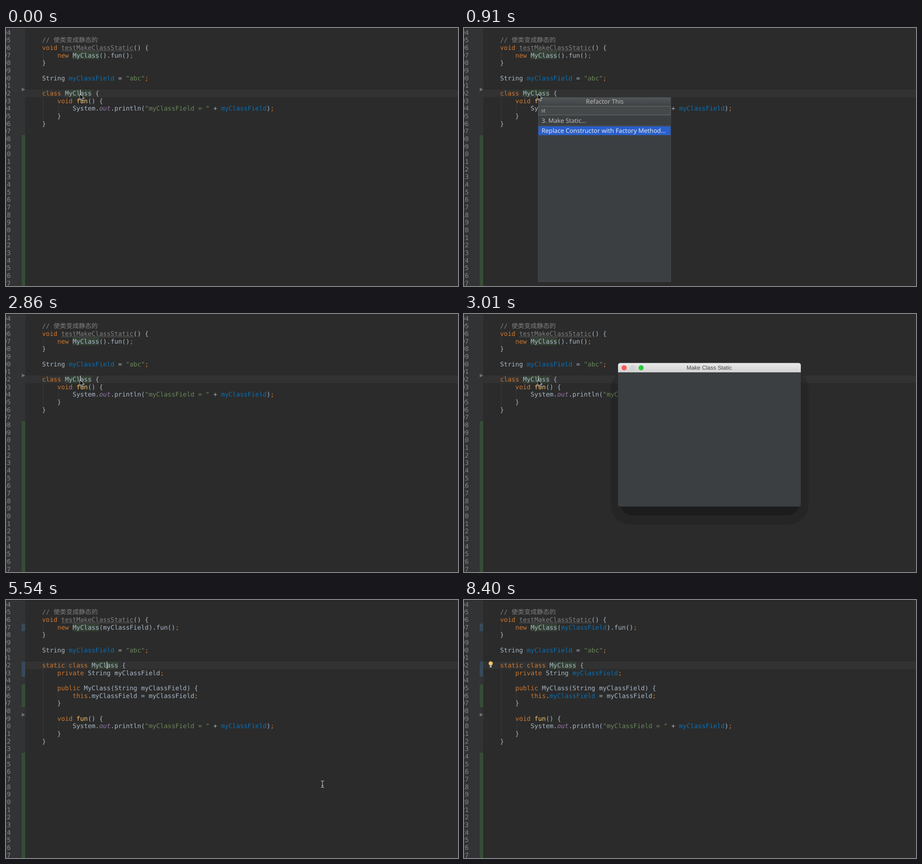
Write an HTML page that moves like this. It is 989x566 px and loops after 8.8 s.

```html
<!DOCTYPE html>
<html lang="zh-CN">
<head>
<meta charset="utf-8">
<title>Make Class Static</title>
<style>
html, body { margin: 0; width: 100%; height: 100%; overflow: hidden; background: #2b2b2b; }
svg { display: block; width: 989px; height: 566px; }
text { white-space: pre; text-rendering: geometricPrecision; }

.code text { font: 13.84px 'DejaVu Sans Mono', 'Noto Sans CJK SC', monospace; fill: #a9b7c6; }
.code .num { fill: #858789; text-anchor: end; }
.code .k { fill: #cc7832; }
.code .s { fill: #6a8759; }
.code .c { fill: #808080; }
.code .f { fill: #0a6fb4; }
.code .m { fill: #ffc66d; }
.code .o { fill: #9876aa; font-style: italic; }
.code .l { fill: #0a6fb4; animation-name: resolve; }
.guide { fill: #393b3c; }
.usage { fill: #344134; }
.added { fill: #384c38; }
.edited { fill: #374a5b; }

.ui text { font: 13.45px 'Noto Sans', 'DejaVu Sans', sans-serif; fill: #bbb; }
.ui .key, .ui .end { text-anchor: end; }
.ui .mid { text-anchor: middle; }
.ui .on { fill: #e4e6ea; }
.ui .dim { fill: #777a7c; }
.ui .typed { font-size: 11px; }
.ui .caption { font-weight: 600; fill: #84878a; }
.ui .title { font: 12.4px 'Liberation Sans', sans-serif; fill: #454545; }
.u { text-decoration: underline; }
.sep { fill: #515456; }

/* hard cuts over one 8.8 s loop */
.t, .l { animation: 8.8s step-end infinite; }
#before { animation-name: before; }
#after { animation-name: after; }
#caret1 { animation-name: caret1; }
#caret2 { animation-name: caret2; }
#bulb { animation-name: bulb; }
#menu { animation-name: menu; }
#all { animation-name: all; }
#typedS { animation-name: typedS; }
#typedSt { animation-name: typedSt; }
#pickLow { animation-name: pickLow; }
#pickTop { animation-name: pickTop; }
#dialog { animation-name: dialog; }
#form { animation-name: form; }
#ringPreview { animation-name: ringPreview; }
#ringRefactor { animation-name: ringRefactor; }
#arrow { animation-name: arrow; }
#beam { animation-name: beam; }
.code .l { animation-name: resolve; }

@keyframes before { 0% { opacity: 1 } 62.95%, 100% { opacity: 0 } }
@keyframes after { 0% { opacity: 0 } 62.95%, 100% { opacity: 1 } }
@keyframes caret1 { 0% { opacity: 1 } 3.63% { opacity: 0 } 32.5% { opacity: 1 } 35.9%, 100% { opacity: 0 } }
@keyframes caret2 { 0% { opacity: 1 } 90.22%, 100% { opacity: 0 } }
@keyframes resolve { 0% { fill: #a9b7c6 } 68.4%, 100% { fill: #0a6fb4 } }
@keyframes bulb { 0% { opacity: 0 } 80%, 100% { opacity: 1 } }
@keyframes menu { 0% { opacity: 0 } 1.59% { opacity: 1 } 32.5%, 100% { opacity: 0 } }
@keyframes all { 0% { opacity: 1 } 6.93%, 100% { opacity: 0 } }
@keyframes typedS { 0% { opacity: 0 } 6.93% { opacity: 1 } 10.34%, 100% { opacity: 0 } }
@keyframes typedSt { 0% { opacity: 0 } 10.34%, 100% { opacity: 1 } }
@keyframes pickLow { 0% { opacity: 1 } 22.27%, 100% { opacity: 0 } }
@keyframes pickTop { 0% { opacity: 0 } 22.27%, 100% { opacity: 1 } }
@keyframes dialog { 0% { opacity: 0 } 34.2% { opacity: 1 } 61.36%, 100% { opacity: 0 } }
@keyframes form { 0% { opacity: 0 } 35.9%, 100% { opacity: 1 } }
@keyframes ringPreview { 0% { opacity: 1 } 57.95%, 100% { opacity: 0 } }
@keyframes ringRefactor { 0% { opacity: 0 } 57.95%, 100% { opacity: 1 } }
@keyframes arrow {
  0% { transform: translate(161.5px, 144.5px); opacity: 1 }
  46.13% { transform: translate(200px, 160px); opacity: 1 }
  47.84% { transform: translate(300px, 213px); opacity: 1 }
  49.54% { transform: translate(440px, 285px); opacity: 1 }
  51.13% { transform: translate(570px, 346px); opacity: 1 }
  52.84% { transform: translate(664px, 388px); opacity: 1 }
  54.54% { transform: translate(692px, 400px); opacity: 1 }
  61.36%, 100% { transform: translate(692px, 400px); opacity: 0 }
}
@keyframes beam {
  0% { transform: translate(692.5px, 404px); opacity: 0 }
  61.36% { transform: translate(692.5px, 404px); opacity: 1 }
  85.11% { transform: translate(714px, 413px); opacity: 1 }
  86.81% { transform: translate(768px, 440px); opacity: 1 }
  88.52% { transform: translate(834px, 477px); opacity: 1 }
  90.22% { transform: translate(893px, 514px); opacity: 1 }
  91.93% { transform: translate(930px, 543px); opacity: 1 }
  93.75% { transform: translate(945px, 558px); opacity: 1 }
  95.45%, 100% { transform: translate(945px, 558px); opacity: 0 }
}
</style>
</head>
<body>
<svg viewBox="0 0 989 566">
  <defs>
    <linearGradient id="bar" x2="0" y2="1"><stop stop-color="#eaeaea"/><stop offset="1" stop-color="#d2d2d2"/></linearGradient>
    <linearGradient id="head" x2="0" y2="1"><stop stop-color="#515557"/><stop offset="1" stop-color="#404446"/></linearGradient>
    <linearGradient id="btn" x2="0" y2="1"><stop stop-color="#555a5c"/><stop offset="1" stop-color="#414648"/></linearGradient>
    <linearGradient id="main" x2="0" y2="1"><stop stop-color="#384f6b"/><stop offset="1" stop-color="#233449"/></linearGradient>
    <g id="box"><rect x=".5" y=".5" width="11" height="11" rx="1" fill="#65696b" stroke="#565a5c"/></g>
    <g id="tick"><use href="#box"/><path d="M2.5 5.5l3 4L13-1" fill="none" stroke="#2c2e2f" stroke-width="3"/><path d="M2.5 5l3 4L12.5-1.5" fill="none" stroke="#d0d0d0" stroke-width="1.8"/></g>
  </defs>

  <rect width="989" height="566" fill="#2b2b2b"/>
  <rect width="42" height="566" fill="#313335"/>
  <rect x="42" y="135" width="947" height="16.7" fill="#323232"/>
  <rect width="989" height="1" fill="#242526"/>
  <g id="shared" class="code"></g>
  <g id="before" class="code t"></g>
  <g id="after" class="code t"></g>

  <g id="menu" class="ui t">
    <rect x="162" y="152" width="290.5" height="405" fill="#3c3f41"/>
    <rect x="162" y="152" width="290.5" height="18.5" fill="url(#head)"/>
    <text class="mid" x="308" y="165.8">Refactor This</text>
    <g id="all" class="t"></g>
    <g id="typedS" class="t"></g>
    <g id="typedSt" class="t"></g>
    <rect x="162.25" y="152.25" width="290" height="404.5" fill="none" stroke="#505355" stroke-width=".6"/>
  </g>

  <g id="dialog" class="ui t">
    <rect x="320.5" y="122" width="433.5" height="340" rx="44" fill="#000" opacity=".12"/>
    <rect x="342" y="140" width="391" height="302" rx="26" fill="#1c1c1c"/>
    <rect x="337" y="107.5" width="400" height="315" rx="5" fill="#3b3f41"/>
    <path d="M337 128v-15.500a5 5 0 0 1 5-5h390a5 5 0 0 1 5 5V128z" fill="url(#bar)"/>
    <circle cx="350.3" cy="118" r="5.7" fill="#fc5b57"/>
    <circle cx="368.900" cy="118" r="5.300" fill="#d4d4d4" stroke="#c2c2c2" stroke-width=".7"/>
    <circle cx="387.500" cy="118" r="5.700" fill="#2ac940"/>
    <text class="title mid" x="536.5" y="122.3">Make Class Static</text>
    <g id="form" class="t">
      <text x="356" y="152">Make class MyClass static</text>
      <use href="#box" x="359" y="166"/>
      <text x="378" y="177">Add <tspan class="u">o</tspan>bject as a parameter to constructors with name:</text>
      <rect x="356.500" y="185.500" width="361" height="23.500" fill="#3d4143" stroke="#5c6062"/>
      <rect x="697" y="186" width="1" height="23" fill="#5c6062"/>
      <path d="M702.500 194.500h9.500l-4.750 5.500z" fill="#6c7072"/>
      <text class="dim" x="360.500" y="202">demo</text>
      <use href="#tick" x="359" y="221"/>
      <text x="378" y="231.700">Add parameters for <tspan class="u">f</tspan>ields to constructors:</text>

      <rect x="356.500" y="239.500" width="361" height="133.500" fill="none" stroke="#545759"/>
      <rect x="357" y="240" width="360.500" height="15" fill="url(#head)"/>
      <path d="M374 240v15M546 240v15M357 255.300h360.500" stroke="#2f3234"/>
      <path d="M357 348.500h360.500" stroke="#545759"/>
      <text class="mid" x="461" y="252.800">Type</text>
      <text class="mid" x="632" y="252.800">Name</text>
      <use href="#tick" x="360.500" y="260"/>
      <text x="375" y="270.700">String</text>
      <path d="M534 263.500h10l-5 5z" fill="#bbb"/>
      <text x="551" y="270.700">myClassField</text>
      <path d="M362 363.300h11l-5.500-6zM385 357.300h11l-5.500 6z" fill="#737779"/>

      <circle cx="362.500" cy="399.700" r="10.500" fill="#53585b"/>
      <text class="mid" x="362.500" y="405.700" style="font-size:17px;font-weight:700;fill:#4a9ed2">?</text>
      <g id="buttons"></g>
      <rect id="ringPreview" class="t" x="567" y="387.500" width="75.500" height="25" rx="4" fill="none" stroke="#466d9c" stroke-width="2"/>
      <rect id="ringRefactor" class="t" x="647.500" y="387.500" width="75" height="25" rx="4" fill="none" stroke="#466d9c" stroke-width="2"/>
    </g>
  </g>

  <path id="arrow" class="t" d="M0 0V13.200L3 10.400L5.200 15.300L7.500 14.300L5.400 9.500H9.500Z" fill="#000" stroke="#fff" stroke-width="1" stroke-linejoin="round"/>
  <g id="beam" class="t" fill="none">
    <path d="M-3.500-7.500Q0-7.500 0-5Q0-7.500 3.500-7.500M0-5V5M-3.500 7.500Q0 7.500 0 5Q0 7.500 3.500 7.500M-2 3H2" stroke="#111" stroke-width="2.600"/>
    <path d="M-3.500-7.500Q0-7.500 0-5Q0-7.500 3.500-7.500M0-5V5M-3.500 7.500Q0 7.500 0 5Q0 7.500 3.500 7.500M-2 3H2" stroke="#e6e6e6" stroke-width="1.200"/>
  </g>
</svg>

<script>
const LINE = 50 / 3, CHAR = 8.333, LEFT = 79;
const top_ = row => 1.67 + row * LINE;
const fill = (id, ...parts) => document.getElementById(id).innerHTML = parts.flat().join('');
const rect = (cls, x, y, w, h) => `<rect class="${cls}" x="${x}" y="${y}" width="${w}" height="${h}"/>`;

// [k word] colours the word with class k
const code = (row, col, s) => `<text x="${LEFT + col * CHAR}" y="${top_(row) + 13.1}">` +
  s.replace(/\[(\w) ([^\]]+)\]/g, '<tspan class="$1">$2</tspan>') + '</text>';
const rows = (cls, x, w, from, n) => rect(cls, x, top_(from), w, n * LINE);
const guide = (col, from, n) => rows('guide', 81 + col * CHAR, 1, from, n);
const usage = (row, col) => rows('usage', LEFT + col * CHAR, 7 * CHAR, row, 1);
const change = (cls, from, n) => rows(cls, 34.3, 7.7, from, n);
const fold = row => `<path d="M34.500 ${top_(row) - 4}v8l7.500-4z" fill="#6f7274"/>`;
const caret = (id, col) => `<rect id="${id}" class="t" x="${LEFT + col * CHAR - .4}" y="135.300" width="1.600" height="16" fill="#c4c4c4"/>`;
const print = row => code(row, 8, 'System.[o out].println([s "myClassField = "] + [f myClassField])[k ;]');

let wave = 'M121 51';
for (let i = 1; i <= 95; i++) wave += `L${(121 + i * 1.667).toFixed(2)} ${i % 2 ? 49.3 : 51}`;

fill('shared',
  Array.from({ length: 34 }, (_, i) => `<text class="num" x="10.300" y="${top_(i) + 13.1}">${94 + i}</text>`),
  guide(0, 3, 1), usage(3, 8),
  code(1, 0, '[c // 使类变成静态的]'),
  code(2, 0, '[k void] [c testMakeClassStatic]() {'),
  `<path d="${wave}" fill="none" stroke="#7a7a7a" stroke-width=".8"/>`,
  code(4, 0, '}'),
  code(6, 0, '[k String]'.replace('[k String]', 'String') + ' [f myClassField] = [s "abc"][k ;]'));

fill('before',
  change('added', 14, 20), fold(8), guide(0, 9, 3), guide(4, 10, 1), usage(8, 6),
  code(3, 4, '[k new] MyClass().fun()[k ;]'),
  code(8, 0, '[k class] MyClass {'),
  code(9, 4, '[k void] [m fun]() {'),
  print(10), code(11, 4, '}'), code(12, 0, '}'),
  caret('caret1', 10));

fill('after',
  change('edited', 3, 1), change('edited', 8, 2), change('added', 11, 3), change('added', 20, 14),
  fold(15), guide(0, 9, 9), guide(4, 12, 1), guide(4, 16, 1), usage(8, 13),
  code(3, 4, '[k new] MyClass([l myClassField]).fun()[k ;]'),
  code(8, 0, '[k static class] MyClass {'),
  code(9, 4, '[k private] String [l myClassField][k ;]'),
  code(11, 4, '[k public] MyClass(String myClassField) {'),
  code(12, 8, '[k this].[l myClassField] = myClassField[k ;]'),
  code(13, 4, '}'),
  code(15, 4, '[k void] [m fun]() {'),
  print(16), code(17, 4, '}'), code(18, 0, '}'),
  caret('caret2', 17),
  `<g id="bulb" class="t"><circle cx="58.400" cy="139" r="4.600" fill="#f2bf56"/>
   <path d="M56.500 138l1.900 2 1.900-2M58.400 140v3" fill="none" stroke="#fbe6b4" stroke-width=".9"/>
   <rect x="56.200" y="143.500" width="4.400" height="4.500" rx="1" fill="#a9a9a9"/></g>`);

// Menu lists: '-' is a divider, '=' the captioned one
const bar = y => `<rect x="162.500" y="${y - 9.7}" width="289.500" height="19.400" fill="#2a60cb"/>`;
const item = (y, s, key = '', on = '') =>
  `<text class="${on}" x="169.700" y="${y + 4.7}">${s}</text><text class="key ${on}" x="443" y="${y + 4.7}">${key}</text>`;
function list(y, items, picked) {
  return items.map(entry => {
    if (entry === '-') {
      y += 2.9;
      return rect('sep', 163, y - 11.6, 289, 1);
    }
    if (entry === '=') {
      y += 17.6;
      return rect('sep', 163, y - 18.8, 121, 1) + rect('sep', 330, y - 18.8, 122, 1) +
        `<text class="mid caption" x="307" y="${y - 14}">Extract</text>`;
    }
    const [s, key] = entry.split('|'), on = s === picked;
    const out = (on ? bar(y) : '') + item(y, s, key, on ? 'on' : '');
    y += 19.4;
    return out;
  }).join('');
}
const search = s => `<rect x="162.500" y="171.500" width="289.500" height="19.500" fill="#45494a" stroke="#686c6e"/>
  <text class="typed" x="169" y="185">${s}</text>`;

const swap = 'Replace Constructor with Factory Method...';
const fix = '3. Make Static...';
fill('all', list(181.6, ['1. Rename...|F2', '2. Change Signature...|⌘F6', fix, '-',
  '4. Move...|F6', '5. Copy...|F5', '6. Safe Delete...|⌘⌦', '=',
  '7. Delegate...', '8. Interface...', '9. Superclass...', '0. Subclass...', '-',
  'Inline...|⌥⌘N', '-', 'Pull Members Up...', 'Push Members Down...',
  'Use Interface Where Possible...', 'Replace Inheritance with Delegation...', '-',
  swap, '-', 'Generify...', '-', 'Remove Unused Resources...'], '1. Rename...'));
fill('typedS', search('s'), list(203, ['2. Change Signature...', fix, '6. Safe Delete...',
  '9. Superclass...', '0. Subclass...', '-', 'Pull Members Up...', 'Push Members Down...',
  'Use Interface Where Possible...', '-', swap, '-', 'Remove Unused Resources...'], '6. Safe Delete...'));
fill('typedSt', search('st'),
  `<g id="pickLow" class="t">${list(203, [fix, '-', swap], swap)}</g>`,
  `<g id="pickTop" class="t">${list(203, [fix, '-', swap], fix)}</g>`);

const button = (x, s, paint) => `<rect x="${x}" y="388.300" width="73.500" height="23.500" rx="3" fill="url(#${paint})" stroke="#63676a"/>
  <text class="mid" x="${x + 36.7}" y="404.800">${s}</text>`;
fill('buttons', button(487.5, 'Cancel', 'btn'), button(568, 'Preview', 'btn'), button(648.5, 'Refactor', 'main'));
</script>
</body>
</html>
```
